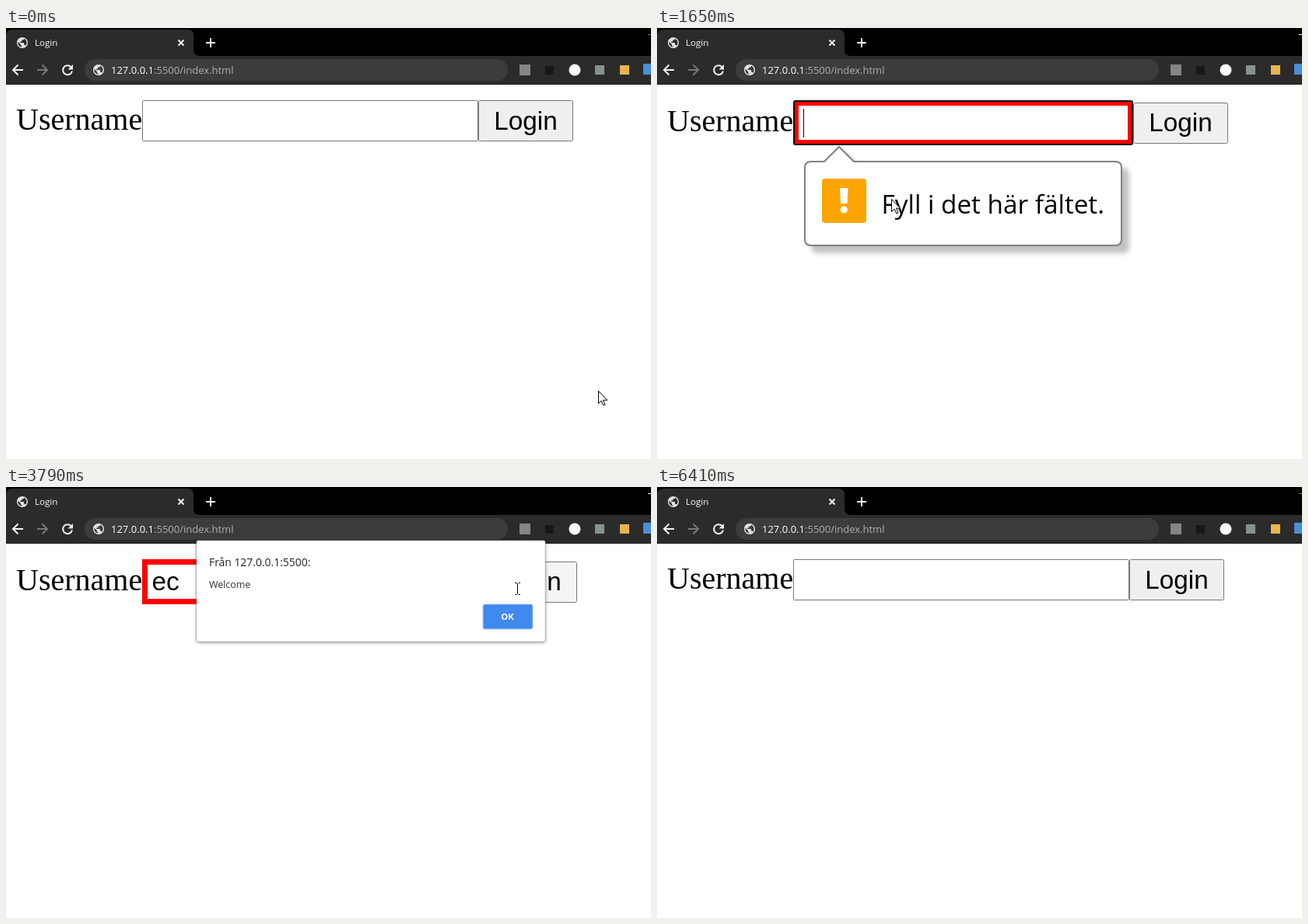
Animation, 829 px wide and 555 px high, one loop 6490 ms. Source, as an HTML page:

```html
<!DOCTYPE html>
<html lang="en">
<head>
<meta charset="utf-8">
<title>Login form</title>
<style>
  html, body { margin: 0; width: 829px; height: 555px; overflow: hidden; background: #fff; }
  svg { display: block; }
  text { font-family: "Open Sans", "Noto Sans", sans-serif; white-space: pre; }
  .arial { font: 33.33px "Liberation Sans", Arial, sans-serif; }
  .times { font: 40px "Liberation Serif", "Times New Roman", serif; }
  .line { fill: none; stroke: #f1f1f1; stroke-width: 2; }
  .mid { text-anchor: middle; }
  #bubble .box { filter: drop-shadow(9px 9px 3px rgba(0, 0, 0, .24)); }
  #dialog rect:first-child { filter: drop-shadow(0 1px 2px rgba(0, 0, 0, .45)); }
</style>
</head>
<body>
<svg width="829" height="555" viewBox="0 0 829 555">
  <defs>
    <path id="globe" fill="#e4e4e4" transform="scale(.7) translate(-12 -12)" d="M12 2C6.48 2 2 6.48 2 12s4.48 10 10 10 10-4.48 10-10S17.52 2 12 2zm-1 17.93c-3.95-.49-7-3.85-7-7.93 0-.62.08-1.21.21-1.79L9 15v1c0 1.1.9 2 2 2v1.93zm6.9-2.54c-.26-.81-1-1.39-1.9-1.39h-1v-3c0-.55-.45-1-1-1H8v-2h2c.55 0 1-.45 1-1V7h2c1.1 0 2-.9 2-2v-.41c2.93 1.19 5 4.06 5 7.41 0 2.08-.8 3.97-2.1 5.39z"/>
    <path id="back" d="M7-0H-6M.5-6.5L-6 0L.5 6.5"/>
  </defs>

  <!-- browser window -->
  <rect width="829" height="36"/>
  <path fill="#2b2b2b" d="M0 36V8Q2 2 9 2H233Q241 2 241 10V28Q241 36 249 36H829V73H0Z"/>
  <rect y="72" width="829" height="1" fill="#1d1d1d"/>
  <rect id="minimize" x="825" y="8" width="4" height="1"/>
  <use href="#globe" x="0" transform="translate(21 19)"/>
  <text x="37" y="23" font-size="11.6" fill="#fff">Login</text>
  <path class="line" stroke-width="1.6" d="M221.5 15.500l7 7m0-7l-7 7M257 19h12M263 13v12"/>
  <use href="#back" class="line" transform="translate(15 54)"/>
  <use href="#back" class="line" style="stroke:#777" transform="translate(47 54) scale(-1 1)"/>
  <path class="line" d="M83.500 50A6 6 0 1 0 85 55.500"/>
  <path fill="#f1f1f1" d="M86 47v6.500h-6.500z"/>
  <rect x="101" y="40" width="544" height="28" rx="14" fill="#3c3c3c"/>
  <use href="#globe" transform="translate(119 54)"/>
  <text x="135" y="59" font-size="13" fill="#b0b0b0"><tspan fill="#fff">127.0.0.1</tspan>:5500/index.html</text>
  <rect x="660" y="47" width="14" height="14" fill="#858585"/>
  <rect x="693" y="49" width="11" height="11" fill="#171717"/>
  <circle cx="731" cy="54" r="7.500" fill="#fff"/>
  <rect x="757" y="48" width="12" height="12" fill="#84938d"/>
  <rect x="789" y="48" width="12" height="12" fill="#e9b450"/>
  <rect x="819" y="46" width="14" height="14" fill="#4a8fdc"/>

  <!-- login form -->
  <g id="plain" fill="none" stroke="#767676">
    <rect x="175.500" y="93.500" width="431" height="52" rx="1"/>
  </g>
  <g id="invalid">
    <rect id="ring" x="175" y="93" width="437" height="58" rx="3" fill="#101010"/>
    <rect id="red" fill="red"/>
    <rect x="182" y="100" width="423" height="44" fill="#fff"/>
  </g>
  <text id="label" class="times" x="13" y="131">Username</text>
  <text id="typed" class="arial" x="187.500" y="133"></text>
  <rect id="caret" y="104" width="1" height="37"/>
  <g id="login">
    <rect id="face" x="607.500" y="93.500" width="121" height="52" rx="2" stroke="#767676"/>
    <text id="loginText" class="arial mid" x="668" y="131">Login</text>
  </g>

  <!-- validation message -->
  <g id="bubble">
    <path id="bubbleBox" class="box" fill="#fff" stroke="#808080" stroke-width="2"/>
    <rect x="212" y="194" width="57" height="57" rx="4" fill="#ffa400"/>
    <path fill="#fff" d="M235 206H245.500L244.500 226H236Z"/>
    <circle cx="240.300" cy="234" r="4.600" fill="#fff"/>
    <text id="message" y="239">Fyll i det här fältet.</text>
  </g>

  <!-- alert -->
  <g id="dialog">
    <rect x="245" y="69" width="448" height="130" rx="2" fill="#fff" stroke="#b4b4b4" stroke-width=".6"/>
    <text x="261" y="102" font-size="13.900" fill="#222">Från 127.0.0.1:5500:</text>
    <text x="261" y="130" font-size="12.400" fill="#333">Welcome</text>
    <rect id="ok" x="613" y="151" width="64" height="32" rx="2.500" stroke="#a9cbf8"/>
    <text class="mid" x="644.500" y="171" font-size="11.300" font-weight="700" fill="#fff">OK</text>
  </g>

  <!-- pointer -->
  <circle id="click" r="12" fill="#ffff00" fill-opacity=".5"/>
  <path id="arrow" fill="#fff" stroke="#000" d="M.5 .5V16.500L4.200 13L6.800 18.900L9 18L6.500 12.200H11.800Z"/>
  <path id="beam" fill="none" stroke="#000" d="M-3 -7.500H-.5M1.500 -7.500H4M.5 -7V7M-3 7.500H-.5M1.500 7.500H4"/>
</svg>
<script>
const LOOP = 6490;
const el = Object.fromEntries([...document.querySelectorAll('[id]')].map(e => [e.id, e]));

// pointer path: time, x, y
const path = [
  [0, 761, 467], [70, 761, 467], [330, 712, 235], [520, 672, 126], [780, 672, 126],
  [940, 520, 225], [1100, 283, 172], [1250, 300, 302], [1410, 300, 286], [1490, 300, 286],
  [1890, 302, 123], [2750, 302, 123], [2960, 470, 148], [3230, 660, 131], [3550, 660, 131],
  [3790, 657, 131], [4110, 500, 150], [4190, 500, 150], [4350, 400, 207], [4500, 298, 140],
  [4680, 340, 125], [4830, 499, 165], [4910, 499, 165], [5300, 643, 173], [5560, 643, 173],
  [5950, 781, 560], [LOOP, 781, 560]
];

const within = (v, a, b) => v >= a && v < b;
const ramp = (t, a, b) => Math.min(1, Math.max(0, (t - a) / (b - a)));
const show = (e, on) => e.style.display = on ? '' : 'none';
function set(e, attrs) { for (const k in attrs) e.setAttribute(k, attrs[k]); }

function pointerAt(t) {
  const i = path.findIndex(p => p[0] > t);
  const [t0, x0, y0] = path[i - 1], [t1, x1, y1] = path[i];
  const k = (t - t0) / (t1 - t0);
  return [Math.round(x0 + (x1 - x0) * k), Math.round(y0 + (y1 - y0) * k)];
}

function drawForm(t, x, y, alert) {
  const invalid = within(t, 620, 5545), focus = within(t, 620, 3550);
  show(el.plain, !invalid);
  show(el.invalid, invalid);
  show(el.ring, focus);
  const inset = focus ? 2 : 0;
  set(el.red, { x: 175 + inset, y: 93 + inset, width: 437 - 2 * inset, height: 58 - 2 * inset, rx: inset / 2 });
  set(el.label, { y: invalid ? 133 : 131 });

  const text = !invalid || t < 2100 ? '' : t < 2380 ? 'e' : 'ec';
  el.typed.textContent = text;
  const typedAt = [620, 2100, 2380][text.length];
  show(el.caret, focus && (t - typedAt) % 1000 < 500);
  set(el.caret, { x: [188, 207, 223][text.length] });

  set(el.login, { transform: invalid ? 'translate(5 3)' : '' });
  set(el.loginText, { y: invalid ? 130 : 131 });
  const hover = !alert && within(x, 607, 734) && within(y, 94, 149);
  set(el.face, { fill: invalid && alert ? '#f5f5f5' : hover ? '#e5e5e5' : '#efefef' });
}

function drawBubble(t) {
  const opacity = ramp(t, 780, 1000) * (1 - ramp(t, 2200, 2400));
  const wide = t > 1500;
  show(el.bubble, opacity > 0);
  set(el.bubble, { opacity });
  set(el.bubbleBox, {
    d: `M198 172H215L234 153L253 172H${wide ? 589 : 587}q8 0 8 8V272q0 8-8 8H198q-8 0-8-8V180q0-8 8-8Z`
  });
  set(el.message, { x: wide ? 288.5 : 287.5, 'font-size': wide ? 33.3 : 33.1 });
}

function drawDialog(t, x, y) {
  const opacity = ramp(t, 3540, 3700) * (1 - ramp(t, 5545, 5700));
  show(el.dialog, opacity > 0);
  set(el.dialog, { opacity, transform: `translate(0 ${-12 * (1 - opacity)})` });
  const hover = within(x, 613, 677) && within(y, 151, 183);
  set(el.ok, { fill: hover ? '#4d91f0' : '#4089ed' });
}

function drawPointer(t, x, y, alert) {
  const overText = alert
    ? within(t, 3700, 3900) || (within(x, 261, 315) && within(y, 116, 135))
    : within(x, 182, 606) && within(y, 100, 145);
  show(el.beam, overText);
  show(el.arrow, !overText);
  const transform = `translate(${x} ${y})`;
  set(el.beam, { transform });
  set(el.arrow, { transform });
  set(el.click, { transform });
  show(el.click, [[540, 680], [3470, 3550], [5440, 5545]].some(([a, b]) => within(t, a, b)));
}

function draw(now) {
  const t = now % LOOP;
  const [x, y] = pointerAt(t);
  const alert = within(t, 3550, 5545);
  set(el.minimize, { fill: within(t, 70, 6410) ? '#fff' : '#777' });
  drawForm(t, x, y, alert);
  drawBubble(t);
  drawDialog(t, x, y);
  drawPointer(t, x, y, alert);
}

const start = performance.now();
function tick() {
  draw(performance.now() - start);
  requestAnimationFrame(tick);
}
tick();
</script>
</body>
</html>
```
